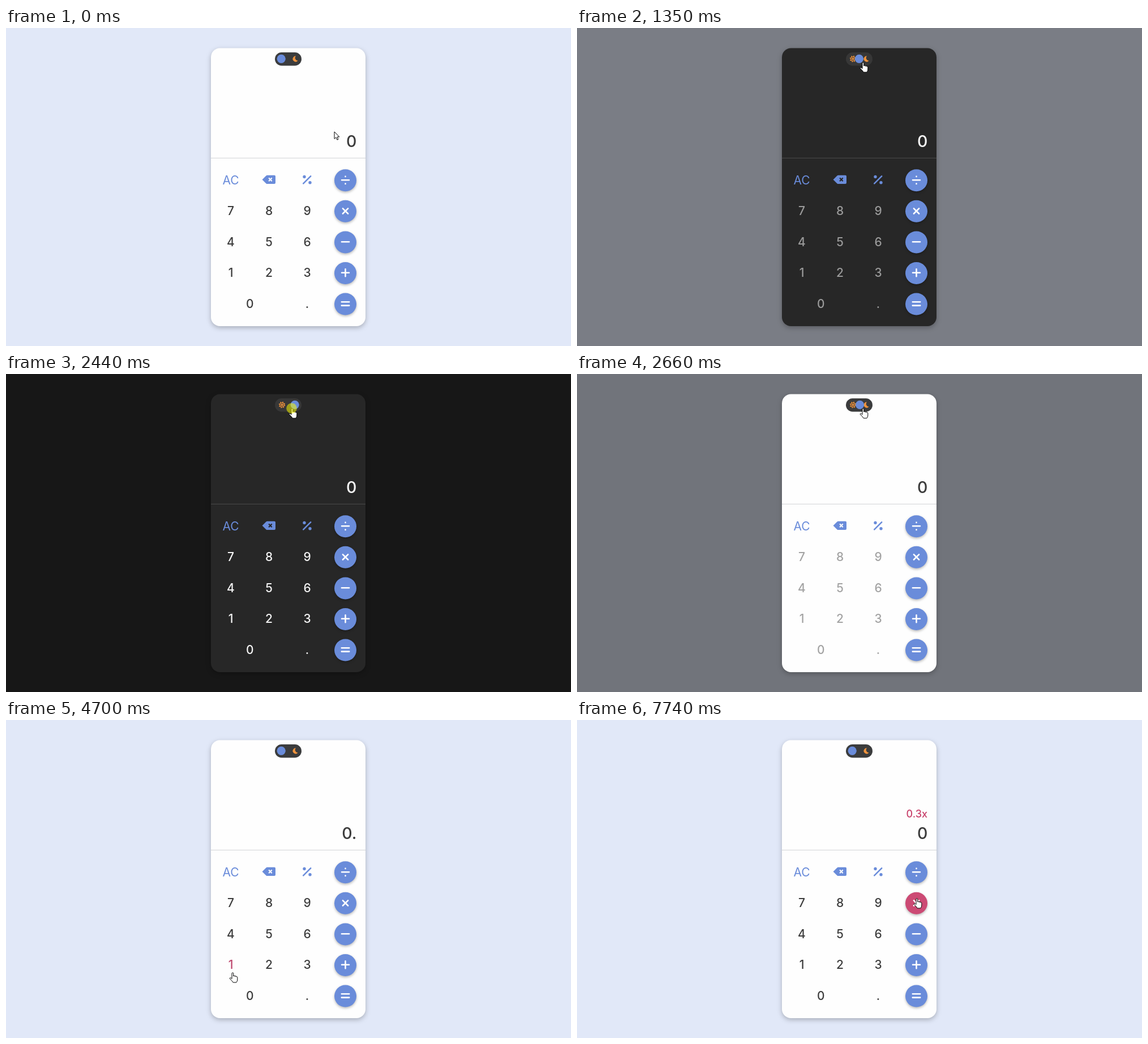
Animation of 998x561 px, one loop 8 s. Source, as an HTML page:

```html
<!DOCTYPE html>
<html lang="en">
<head>
<meta charset="utf-8">
<title>Calculator</title>
<style>
html, body { margin: 0; height: 100%; overflow: hidden; }
svg { display: block; width: 998px; height: 561px; font-family: Inter, Roboto, sans-serif; --card: #fefefe; --line: #d2d4d6; --ink: #3d3d3d; --pill: #3b3c3d; }
svg.dark { --card: #272727; --line: #4a4a4a; --ink: #f4f4f4; --pill: #373737; }
.card { fill: var(--card); filter: drop-shadow(0 3px 4px rgba(0,0,0,.25)); }
.disc { filter: drop-shadow(0 2px 2px rgba(0,0,0,.28)); }
.digit { font-size: 21px; font-weight: 500; text-anchor: middle; }
.ac { font-size: 21px; text-anchor: middle; }
#past, #main { text-anchor: end; }
#past { font-size: 18px; font-weight: 500; fill: #c8416b; }
#main { font-size: 28.5px; font-weight: 500; fill: var(--ink); }
.sign { fill: none; stroke: #fff; stroke-width: 2.6; stroke-linecap: round; }
.cursor path { fill: #fff; stroke: #000; stroke-width: 1; stroke-linejoin: round; }
</style>
</head>
<body>
<svg id="stage" viewBox="0 0 998 561">
  <rect id="back" width="998" height="561"/>
  <rect class="card" x="362" y="35.5" width="273" height="490.5" rx="16"/>
  <path d="M362 229.5H635" stroke="var(--line)"/>
  <rect x="475" y="43" width="47" height="23.5" rx="11.75" fill="var(--pill)"/>
  <g fill="none" stroke="#ef933c">
    <circle cx="487.5" cy="54.5" r="4.8" stroke-width="1.8" stroke-dasharray="1.9 1.87"/>
    <circle cx="487.5" cy="54.5" r="3.5" stroke-width="1.2"/>
    <circle cx="487.5" cy="54.5" r="1.9" fill="#ef933c" stroke="none"/>
  </g>
  <path d="M512 49.6A5 5 0 1 0 515.6 57.4A4.6 4.6 0 0 1 512 49.6Z" fill="#ef933c"/>
  <circle id="knob" cy="54.3" r="7.6" fill="#6a8cda"/>
  <text id="past" x="619" y="171.5"></text>
  <text id="main" x="619.5" y="210"></text>
  <g id="pad"></g>
  <g id="cursor" class="cursor">
    <path id="arrow" d="M0 0V12.5L2.9 9.9 4.9 14.3 6.9 13.4 5 9.1H8.8Z"/>
    <path id="hand" d="M-1 9V1.2a1.4 1.4 0 0 1 2.8 0V6a1.3 1.3 0 0 1 2.6 .6 1.2 1.2 0 0 1 2.4 .5 1.2 1.2 0 0 1 2 1V12q0 3-2 5H1.2Q-1 13.5-4.6 10.5q-.8-1.6.8-1.7Q-2.4 9-1 10.5Z"/>
    <circle id="press" cx="-.5" cy="-.5" r="9.3" fill="#ff0" fill-opacity=".52"/>
  </g>
</svg>
<script>
const LOOP = 8000, FADE = 300, TO_DARK = 1198, TO_LIGHT = 2528;
const BLUE = [106, 140, 218], PINK = [204, 74, 116];
const $ = id => document.getElementById(id);
const clamp = v => Math.min(1, Math.max(0, v));
const mix = (a, b, k) => `rgb(${a.map((v, i) => Math.round(v + (b[i] - v) * k))})`;
const blend = (a, b, k) => a.map((v, i) => v + (b[i] - v) * k);

// Cursor stops: time, x, y
const path = [
  [30, 580, 183], [450, 505, 61], [3140, 505, 61], [3170, 505, 78], [3700, 546, 487],
  [4090, 546, 487], [4530, 400, 446], [4920, 400, 446], [5300, 600, 432],
  [5630, 600, 432], [5900, 540, 484], [6090, 540, 484], [6200, 511, 475],
  [6440, 465, 420], [7230, 465, 420], [7440, 600, 315], [LOOP, 600, 315]
];
const presses = [1110, 2440, 3990, 4820, 5510, 5990, 7000, 7650];
const screens = [
  [0, '', '0'], [4080, '', '0.'], [4910, '', '0.1'], [5600, '0.1+', '0'],
  [6080, '0.1+', '0.'], [7090, '0.1+', '0.2'], [7740, '0.3x', '0']
];

const signs = {
  '÷': 'M-6.5 -.5H6.5M0 -7V-6.6M0 5.8V6.2',
  '×': 'M-4.6 -5L4.6 4.2M4.6 -5L-4.6 4.2',
  '−': 'M-6.5 -.7H6.5',
  '+': 'M-6.5 -.8H6.5M0 -7.3V5.7',
  '=': 'M-6.7 -3.9H6.7M-6.7 2.5H6.7'
};
const icons = {
  '⌫': `<path d="M-12 -1.2L-5.2 -8Q-4.2 -9 -3 -9H9.5Q11.5 -9 11.5 -7V4.4Q11.5 6.4 9.5 6.4H-3Q-4.2 6.4 -5.2 5.5Z"/>
    <path d="M-.4 -4.1L5.2 1.5M5.2 -4.1L-.4 1.5" stroke="var(--card)" stroke-width="2.1"/>`,
  '%': `<path d="M-6.8 5.7L6.2 -7.3" stroke="currentColor" stroke-width="2.5" stroke-linecap="round"/>
    <circle cx="-5" cy="-6.2" r="2.7"/><circle cx="5" cy="4" r="2.7"/>`
};

function face(label) {
  if (signs[label]) return `<circle class="disc" r="19.5" fill="currentColor"/><path class="sign" d="${signs[label]}"/>`;
  return icons[label] || `<text class="${label === 'AC' ? 'ac' : 'digit'}" y="6.9">${label}</text>`;
}

const keys = [];
['AC ⌫ % ÷', '7 8 9 ×', '4 5 6 −', '1 2 3 +', '0 _ . ='].forEach((row, r) =>
  row.split(' ').forEach((label, c) => {
    if (label === '_') return;
    const wide = label === '0';
    const x = 397 + 67.5 * (wide ? .5 : c), y = 268.7 + 54.6 * r;
    const el = document.createElementNS('http://www.w3.org/2000/svg', 'g');
    el.setAttribute('transform', `translate(${x} ${y})`);
    el.setAttribute('fill', 'currentColor');
    el.innerHTML = face(label);
    $('pad').append(el);
    keys.push({ el, x, y, half: wide ? 54 : 21.5, digit: /[\d.]/.test(label) });
  }));

function cursorAt(t) {
  const i = path.findIndex(p => p[0] > t);
  if (i < 1) return path[0].slice(1);
  const [t0, ...a] = path[i - 1], [t1, ...b] = path[i];
  const k = (t - t0) / (t1 - t0);
  return blend(a, b, k * k * (3 - 2 * k));
}
const hits = (key, [x, y]) => Math.abs(x - key.x) < key.half && Math.abs(y - key.y) < 20.5;

function draw(t) {
  const dark = t >= TO_DARK && t < TO_LIGHT;
  const shade = clamp((t - TO_DARK) / FADE) - clamp((t - TO_LIGHT) / FADE);
  $('stage').classList.toggle('dark', dark);
  $('back').setAttribute('fill', mix([225, 232, 248], [23, 23, 23], shade));
  $('knob').setAttribute('cx', 486.2 + 24 * shade);

  const [, past, main] = screens.findLast(s => s[0] <= t);
  $('past').textContent = past;
  $('main').textContent = main;

  // A linear fade equals the share of recent time spent hovering
  const trail = Array.from({ length: 20 }, (_, i) => cursorAt(t - i * FADE / 20));
  const ink = blend([61, 61, 61], [244, 244, 244], shade);
  for (const key of keys) {
    const hover = trail.filter(p => hits(key, p)).length / trail.length;
    key.el.style.color = mix(key.digit ? ink : BLUE, PINK, hover);
  }

  const [x, y] = trail[0];
  const onToggle = x > 475 && x < 522 && y > 43 && y < 66.5;
  const pointing = onToggle || keys.some(k => hits(k, trail[0]));
  $('cursor').setAttribute('transform', `translate(${x} ${y})`);
  $('hand').style.display = pointing ? '' : 'none';
  $('arrow').style.display = pointing ? 'none' : '';
  $('press').style.display = presses.some(p => t >= p && t < p + 88) ? '' : 'none';
}

const start = performance.now();
function tick() {
  draw((performance.now() - start) % LOOP);
  requestAnimationFrame(tick);
}
tick();
</script>
</body>
</html>
```
